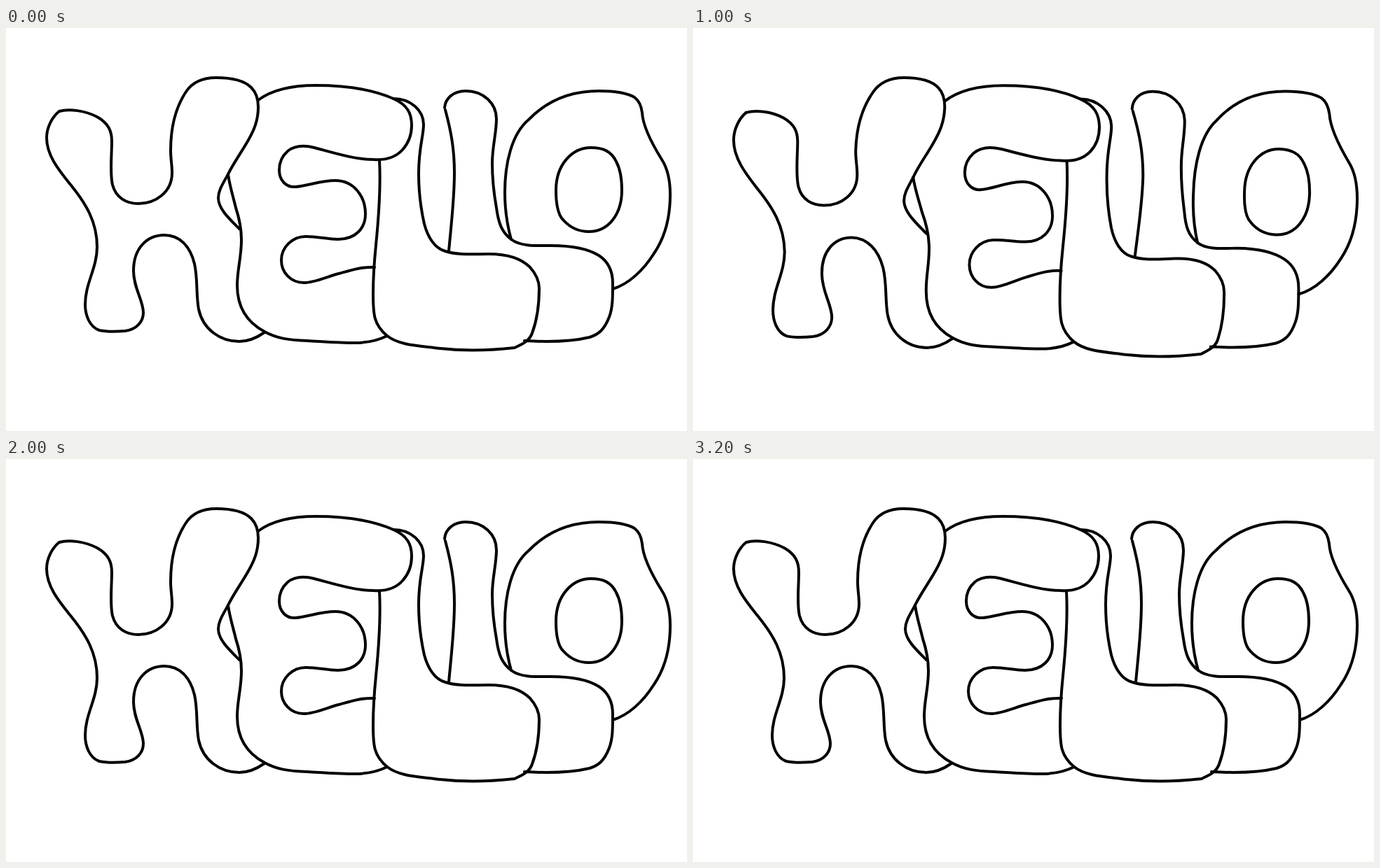
These frames come from a looping animation (972 by 576 pixels, 3.4 s). An HTML page:

```html
<!DOCTYPE html>
<html lang="en">
<head>
<meta charset="utf-8">
<title>Hello</title>
<style>
html, body { margin: 0; width: 100%; height: 100%; overflow: hidden; background: #fff; }
svg { display: block; width: 972px; height: 576px; }
path { fill: none; stroke: #000; stroke-width: 4; stroke-linecap: round; stroke-linejoin: round; }
</style>
</head>
<body>
<svg viewBox="0 0 972 576" role="img" aria-label="Hello">
  <!-- H -->
  <path d="M76 119C90 115 113 118 130 127C146 136 151 147 151 162C151 182 148 207 152 224C157 243 172 251 189 251C213 251 237 235 237 207C237 195 235 188 235 175C235 140 243 112 257 91C267 76 283 71 300 71C320 71 340 75 350 85C357 92 360 103 360 113C360 132 354 146 346 160C334 181 324 194 317 209C308 225 303 233 303 243C303 258 318 272 333 287"/>
  <path d="M76 119C66 127 58 142 58 157C58 183 77 205 93 225C114 251 130 277 130 313C130 343 113 365 113 395C113 410 119 427 133 432C142 434 158 434 170 433C186 431 196 420 196 407C196 389 182 372 182 347C182 315 201 296 226 296C248 296 263 312 269 337C274 359 271 381 275 402C281 430 305 448 333 448C348 448 359 442 369 435"/>
  <!-- E -->
  <path d="M360 103C380 88 408 82 442 82C492 82 526 89 553 101C573 110 579 122 579 139C579 151 575 164 566 174C555 186 540 189 525 188C498 188 470 179 440 171C424 167 412 168 402 176C393 184 390 193 390 203C390 218 400 228 413 227C430 226 448 218 470 218C496 218 513 240 513 266C513 286 499 302 474 302C458 302 446 298 428 298C409 298 393 313 393 332C393 349 406 364 425 364C441 364 459 355 475 351C493 346 508 341 526 342"/>
  <path d="M317 209C319 225 325 244 328 257C332 269 336 286 336 303C336 328 330 345 330 368C330 399 343 420 369 434C387 444 404 446 430 447C450 448 475 450 498 450C517 450 532 446 544 440"/>
  <!-- L -->
  <path d="M533 189C535 225 532 270 528 310C525 340 524 360 524 380C524 410 525 424 544 440C562 454 590 454 620 458C655 462 690 461 726 457C736 452 747 448 751 436C757 420 761 400 761 372C761 362 756 351 748 342C733 327 712 323 689 323C668 323 645 325 627 319C612 315 602 299 597 280C592 258 589 230 589 208C589 170 596 155 596 138C596 118 578 101 553 101"/>
  <!-- L -->
  <path d="M626 114C627 101 638 90 656 90C682 90 700 108 700 130C700 150 694 170 694 193C694 222 697 240 700 257C703 280 708 292 721 302C735 313 760 311 778 311C805 311 828 314 846 325C860 334 866 347 866 365C866 385 866 400 861 413C854 431 846 438 833 442C808 448 775 449 740 447"/>
  <path d="M627 117C635 147 640 172 640 207C640 245 635 285 632 319"/>
  <!-- O -->
  <path d="M721 302C714 277 712 255 712 235C712 193 722 151 746 131C773 103 808 90 846 90C868 90 887 93 897 99C905 105 907 113 908 121C909 142 923 167 936 188C945 202 948 218 948 238C948 270 940 300 925 322C910 346 889 366 866 373"/>
  <path d="M835 171C808 171 785 195 785 232C785 252 788 268 796 275C805 285 817 291 832 291C860 291 879 266 879 232C879 217 877 202 871 191C864 176 852 171 835 171Z"/>
</svg>
<script>
const LOOP = 3400, STEP = 200;
const paths = [...document.querySelectorAll('path')];

// Hand-drawn wobble that keeps shared corners together
function warp(x, y) {
  const dx = 3 * Math.sin((504 - x) / 142) * Math.cos(y / 60);
  const dy = 9 * (y - 70) / 390 + 2 * Math.sin(x / 45) * Math.sin((y - 70) / 124);
  return `${(x + dx).toFixed(1)} ${(y + dy).toFixed(1)}`;
}

const poses = paths.map(p => {
  const d = p.getAttribute('d');
  return [d, d.replace(/(\d+) (\d+)/g, (_, x, y) => warp(+x, +y))];
});

function draw(now) {
  const pose = Math.floor(now % LOOP / STEP) % 2;
  paths.forEach((p, i) => p.setAttribute('d', poses[i][pose]));
  requestAnimationFrame(draw);
}
requestAnimationFrame(draw);
</script>
</body>
</html>
```
